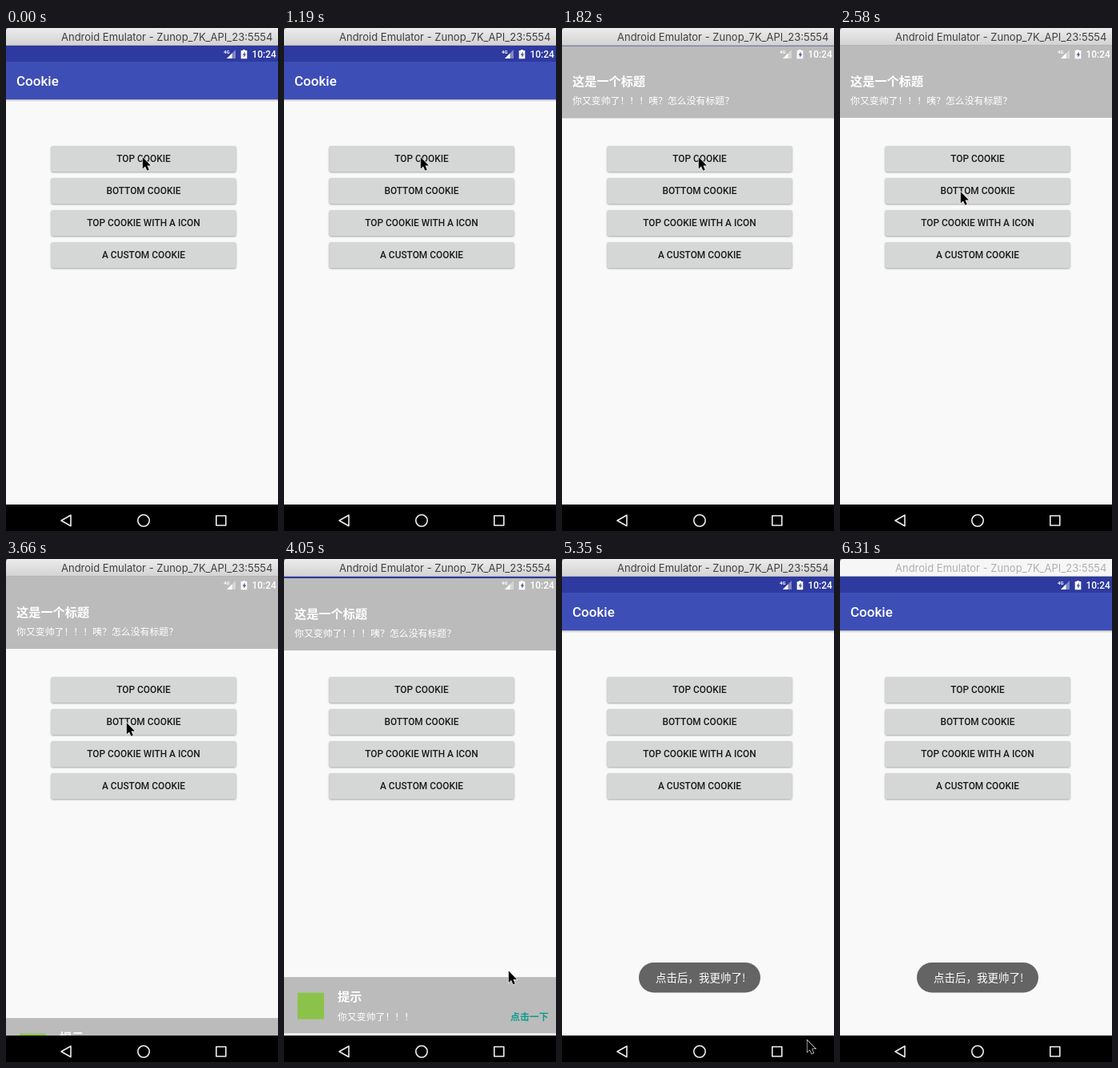
An HTML page for the animation above (6.34 s loop, 340 by 627 pixels).

```html
<!DOCTYPE html>
<html lang="zh-CN">
<head>
<meta charset="utf-8">
<title>Cookie</title>
<style>
  html, body { margin: 0; width: 100%; height: 100%; overflow: hidden; background: #f9f9f9; }
  svg { display: block; width: 340px; height: 627px; }
  .roboto { font: 500 11.9px Roboto, sans-serif; }
  .cjk { font: 400 11.9px "Noto Sans CJK SC", "Noto Sans CJK", sans-serif; fill: #fff; }
  .head { font-size: 15.2px; font-weight: 700; }
</style>
</head>
<body>
<svg viewBox="0 0 340 627">
  <defs>
    <linearGradient id="chrome" x2="0" y2="1">
      <stop stop-color="#ececec"/><stop offset="1" stop-color="#d2d2d2"/>
    </linearGradient>
    <linearGradient id="fade" x2="0" y2="1">
      <stop stop-opacity=".25"/><stop offset="1" stop-opacity="0"/>
    </linearGradient>
    <filter id="soft" x="-10%" y="-30%" width="120%" height="160%"><feGaussianBlur stdDeviation=".8"/></filter>
  </defs>

  <rect width="340" height="627" fill="#f9f9f9"/>
  <rect y="22" width="340" height="20" fill="#2e3a9f"/>
  <rect y="42" width="340" height="47" fill="#3d4eb7"/>
  <rect y="89" width="340" height="3" fill="url(#fade)"/>
  <text class="roboto" x="13" y="72" fill="#fff" style="font-size:17px">Cookie</text>

  <g id="buttons"></g>

  <g id="top">
    <rect y="22" width="340" height="90" fill="#bbb"/>
    <text class="cjk head" x="13" y="71.6">这是一个标题</text>
    <text class="cjk" x="13" y="95">你又变帅了！！！咦？怎么没有标题？</text>
  </g>

  <g id="bottom">
    <rect y="524" width="340" height="70" fill="#bbb"/>
    <rect x="17" y="543.5" width="33" height="33" fill="#8bc34a"/>
    <text class="cjk head" x="67" y="554">提示</text>
    <text class="cjk" x="67" y="578">你又变帅了！！！</text>
    <text class="cjk" x="283" y="578" style="fill:#0f9d8c;font-weight:700">点击一下</text>
  </g>

  <g id="toast">
    <rect x="96" y="503" width="152" height="37.5" rx="18.7" fill="#505050" fill-opacity=".88"/>
    <text class="cjk" x="117" y="527" style="font-size:13.5px">点击后，我更帅了!</text>
  </g>

  <g fill="#fff">
    <text class="roboto" x="307.5" y="37">10:24</text>
    <text class="roboto" x="272" y="32" style="font-size:6px;font-weight:700">4G</text>
    <path d="M287 27V38H276Z" opacity=".4"/>
    <path d="M282.5 31.5V38H276Z"/>
    <path d="M296 27h3v1h2.3v10.2h-7.6V28H296Z"/>
    <path d="M298.6 29.5l-3 4.2h1.7v3l3-4.2h-1.7Z" fill="#555d9b"/>
  </g>

  <rect y="594" width="340" height="33"/>
  <g fill="none" stroke="#eee" stroke-width="1.6" stroke-linejoin="round">
    <path d="M69 614L81 607.2V620.8Z"/>
    <circle cx="172" cy="614" r="7.2"/>
    <rect x="262.8" y="608" width="12" height="12"/>
  </g>

  <rect id="bar" width="340" height="22" fill="url(#chrome)"/>
  <rect y="21" width="340" height="1" fill="#b4b4b4"/>
  <path d="M0 0H4Q0 0 0 4Z" fill="#a8666c"/>
  <text id="caption" x="69" y="16" style="font:400 13px Inter, sans-serif">Android Emulator - Zunop_7K_API_23:5554</text>

  <path id="cursor" d="M.8 1V15.4L4 12.4 6.4 17.8 8.8 16.7 6.5 11.4H11Z" stroke="#fff" stroke-width="1.2" paint-order="stroke"/>
</svg>
<script>
const LOOP = 6340, SLIDE = 500, TENSION = 2.2;
const $ = id => document.getElementById(id);
const clamp = v => Math.min(1, Math.max(0, v));

$('buttons').innerHTML = ['TOP COOKIE', 'BOTTOM COOKIE', 'TOP COOKIE WITH A ICON', 'A CUSTOM COOKIE']
  .map((label, i) => `<g transform="translate(56.5 ${147 + i * 40})">
    <rect class="shade" y="1" width="231" height="32" rx="2" opacity=".35" filter="url(#soft)"/>
    <rect width="231" height="32" rx="2" fill="#d5d7d6"/>
    <rect class="tint" width="231" height="32" rx="2" opacity="0"/>
    <text class="roboto" x="115.5" y="20.2" text-anchor="middle" fill="#1b1b1b">${label}</text></g>`).join('');
const shades = document.querySelectorAll('.shade'), tints = document.querySelectorAll('.tint');

// Pointer tip: time, x, y
const path = [[2270, 170, 160], [2580, 150, 203], [3690, 150, 203], [4050, 280, 512.5],
  [4280, 294, 551.5], [4530, 302, 571], [5150, 302, 571], [5330, 306, 601],
  [5400, 305, 594], [5550, 305, 594], [5870, 311, 629]];

function pointer(t) {
  const i = path.findIndex(p => p[0] > t);
  if (i < 1) return path[i ? path.length - 1 : 0].slice(1);
  const [a, b] = [path[i - 1], path[i]], k = (t - a[0]) / (b[0] - a[0]);
  return [a[1] + (b[1] - a[1]) * k, a[2] + (b[2] - a[2]) * k];
}

const anticipate = k => k * k * ((TENSION + 1) * k - TENSION);

// Share of the panel's height by which it is hidden; negative past its rest place
function hidden(t, enter, exit) {
  return anticipate(1 - clamp((t - enter) / SLIDE)) + anticipate(clamp((t - exit) / SLIDE));
}

function slide(id, distance, t, from, enter, leave, exit) {
  const h = t < from ? 1 : hidden(t, enter, t < leave ? Infinity : exit);
  $(id).setAttribute('transform', `translate(0 ${distance * h})`);
  $(id).setAttribute('visibility', h >= 1 ? 'hidden' : 'visible');
}

function press(i, t, start, end, tint) {
  const k = Math.sin(Math.PI * clamp((t - start + 30) / (end - start + 30)));
  tints[i].setAttribute('opacity', tint * k);
  shades[i].setAttribute('opacity', .35 + .3 * k);
  shades[i].setAttribute('y', 1 + k);
}

function draw(t) {
  press(0, t, 1040, 1190, .08);
  press(1, t, 3270, 3450, .03);
  slide('top', -90, t, 1400, 1345, 3714, 3714);
  slide('bottom', 70, t, 3660, 3627, 4820, 4745);

  const k = 1 - clamp((t - 4820) / SLIDE);
  $('toast').setAttribute('opacity', 1 - k * k);

  const idle = t >= 6310;
  $('bar').setAttribute('fill', idle ? '#f6f6f6' : 'url(#chrome)');
  $('caption').setAttribute('fill', idle ? '#b0b0b0' : '#404040');

  $('cursor').setAttribute('transform', `translate(${pointer(t)})`);
  $('cursor').setAttribute('visibility', t < 5870 ? 'visible' : 'hidden');
}

let began;
function tick(now) {
  began ??= now;
  draw((now - began) % LOOP);
  requestAnimationFrame(tick);
}
draw(0);
requestAnimationFrame(tick);
</script>
</body>
</html>
```
